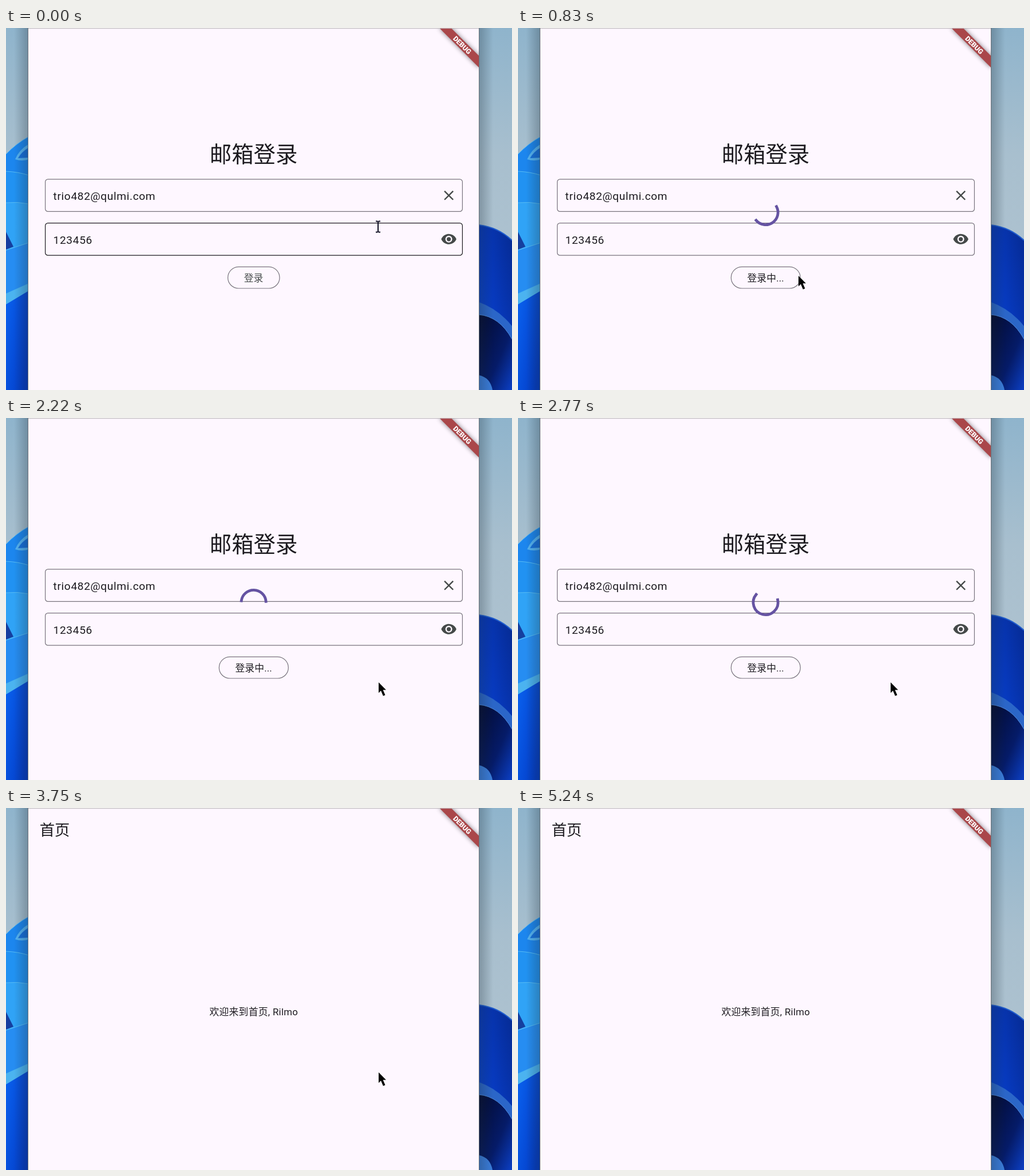
An HTML page that plays this animation: 884 by 634 pixels, repeating every 5.7 s.

```html
<!DOCTYPE html>
<html lang="zh">
<head>
<meta charset="utf-8">
<title>邮箱登录</title>
<style>
  html, body { margin: 0; width: 100%; height: 100%; overflow: hidden; background: #fef7ff; }
  svg { display: block; width: 100vw; height: 100vh; }
  text { font-family: Roboto, "Noto Sans CJK SC", "Noto Sans CJK", sans-serif; fill: #1d1b20; }
  .mid { text-anchor: middle; }
  .input { font-size: 19.2px; letter-spacing: .6px; }
  .label { font-size: 16.8px; letter-spacing: .12px; }
  .box { fill: none; stroke: #79747e; stroke-width: 1.2; }
  .icon { fill: #454949; }
  .cursor { fill: #000; stroke: #fff; stroke-width: .7; paint-order: stroke; }
</style>
</head>
<body>
<svg viewBox="0 0 884 634" preserveAspectRatio="none">
  <defs>
    <linearGradient id="sky" x2="0" y2="1">
      <stop offset="0" stop-color="#8fb4cc"/>
      <stop offset=".35" stop-color="#a8bfce"/>
      <stop offset="1" stop-color="#b4c5d1"/>
    </linearGradient>
    <linearGradient id="deepL" x1="0" x2="1" y2=".6">
      <stop offset="0" stop-color="#0a62f0"/>
      <stop offset="1" stop-color="#033cc6"/>
    </linearGradient>
    <linearGradient id="deepR" x1="1" y1="0" x2="0" y2="1">
      <stop offset="0" stop-color="#062a92"/>
      <stop offset=".5" stop-color="#0739bd"/>
      <stop offset="1" stop-color="#0a4de0"/>
    </linearGradient>
    <linearGradient id="night" x2="1" y2="1">
      <stop offset="0" stop-color="#03092f"/>
      <stop offset=".6" stop-color="#051b68"/>
      <stop offset="1" stop-color="#0c3fc4"/>
    </linearGradient>
    <linearGradient id="shade">
      <stop offset="0" stop-color="#1a2a36" stop-opacity="0"/>
      <stop offset="1" stop-color="#1a2a36" stop-opacity=".3"/>
    </linearGradient>
    <filter id="soft" x="-30%" y="-150%" width="160%" height="400%">
      <feGaussianBlur stdDeviation="4.5"/>
    </filter>
    <clipPath id="pane"><rect x="39" y="1" width="787" height="633"/></clipPath>
  </defs>

  <rect width="884" height="634" fill="url(#sky)"/>
  <g id="left">
    <path d="M0 221Q18 202 40 190V634H0Z" fill="#1c86ee"/>
    <path d="M40 203Q22 214 16 230Q28 234 40 230Z" fill="#55b4f3"/>
    <path d="M40 209Q27 217 21 228L40 227Z" fill="#1670dc"/>
    <path d="M0 251Q22 252 40 258V308Q20 304 0 306Z" fill="#2192f2"/>
    <path d="M0 306Q20 304 40 308V380L0 390Z" fill="#30a3f6"/>
    <path d="M0 390L40 376V450L0 466Z" fill="#268df2"/>
    <path d="M0 251Q22 252 40 258M0 306Q20 304 40 308M0 221Q18 202 40 190M0 389L40 376" fill="none" stroke="#58bdf5"/>
    <path d="M0 357L13 383L0 388Z" fill="#153f9f"/>
    <path d="M0 484L40 459V634H0Z" fill="url(#deepL)"/>
    <path d="M0 465L40 447V460L0 484Z" fill="#4bb3f0"/>
  </g>
  <g id="right">
    <path d="M826 345Q860 349 884 372V634H826Z" fill="url(#deepR)"/>
    <path d="M826 345Q860 349 884 372" fill="none" stroke="#1f5ccd" stroke-width="2"/>
    <path d="M826 480Q860 492 884 522V545Q860 505 826 502Z" fill="#2b66c8"/>
    <path d="M826 502Q862 505 884 545V634H826Z" fill="url(#night)"/>
    <path d="M826 502Q862 505 884 545" fill="none" stroke="#4f8bdc"/>
    <path d="M826 608Q846 612 850 634H826Z" fill="#3a7cda"/>
  </g>
  <rect x="14" width="25" height="634" fill="url(#shade)"/>
  <rect width="25" height="634" fill="url(#shade)" transform="translate(851) scale(-1 1)"/>

  <rect x="38.5" y="-2" width="788" height="640" fill="#fef7ff" stroke="#6b7379"/>
  <rect x="39" width="787" height="1.3" fill="#c5c1c6"/>

  <g id="login">
    <text class="mid" x="432.6" y="235.4" font-size="38.4">邮箱登录</text>
    <rect class="box" x="68.6" y="264.8" width="728.8" height="56.6" rx="4.8"/>
    <text class="input" x="82.6" y="301">trio482@qulmi.com</text>
    <path class="icon" transform="translate(759.2 278.8) scale(1.2)" d="M19 6.4L17.6 5 12 10.6 6.4 5 5 6.4 10.6 12 5 17.6 6.4 19 12 13.4 17.6 19 19 17.6 13.4 12z"/>
    <rect class="box" id="pass" x="68.6" y="341.6" width="728.8" height="56.6" rx="4.8"/>
    <text class="input" x="82.6" y="378">123456</text>
    <path class="icon" transform="translate(759.2 355.4) scale(1.2)" fill-rule="evenodd" d="M12 4.5C7 4.5 2.7 7.6 1 12c1.7 4.4 6 7.5 11 7.5s9.3-3.1 11-7.5c-1.7-4.4-6-7.5-11-7.5zM12 17a5 5 0 1 1 0-10 5 5 0 0 1 0 10zM12 9a3 3 0 1 0 0 6 3 3 0 0 0 0-6z"/>
    <rect class="box" id="button" y="418.4" height="37.6" rx="18.8"/>
    <text class="label mid" id="caption" x="432.6" y="443.8"></text>
    <path id="spinner" fill="none" stroke="#6553a2" stroke-width="4.8" stroke-linecap="square"/>
  </g>

  <g id="home">
    <text x="58.7" y="47.6" font-size="26.4">首页</text>
    <text class="mid" x="432.8" y="363.3" font-size="16.8" letter-spacing=".3">欢迎来到首页, Rilmo</text>
  </g>

  <g clip-path="url(#pane)">
    <g transform="translate(826 1) rotate(45)">
      <rect x="-48" y="33.6" width="96" height="14.4" opacity=".5" filter="url(#soft)"/>
      <rect x="-48" y="33.6" width="96" height="14.4" fill="#aa474a"/>
      <text class="mid" y="45.2" font-size="12.2" font-weight="900" style="fill:#fff">DEBUG</text>
    </g>
  </g>

  <circle id="click" cx="431" cy="423" r="15" fill="#f6f02c" opacity=".75"/>
  <g id="cursor">
    <path id="beam" d="M-4 -10.5H-1L0 -9.5L1 -10.5H4V-8.5H1V8.5H4V10.5H1L0 9.5L-1 10.5H-4V8.5H-1V-8.5H-4Z" fill="#0b0b20"/>
    <path id="hand" class="cursor" d="M-1.8 1Q0 -2 1.8 1V8L5 8.6 8.5 9.6 11.5 11Q13 12 12.4 15L10 20.5V25H-2.5V22L-8 16.5Q-10.5 13.5 -8 12.8L-4.8 14.5 -1.8 16Z"/>
    <path id="arrow" class="cursor" d="M0 0V18.4L4 14.6 7.9 23.8 11.5 22.2 7.6 13.2H13Z"/>
  </g>
</svg>
<script>
const LOOP = 5700, TICK = 69.4;
const PRESS = 480, RELEASE = 550, IDLE = 760, HOME = 3750;
const $ = id => document.getElementById(id);
const show = (id, on) => $(id).style.display = on ? '' : 'none';

// time, x, y, pointer
const moves = [
  [0, 650, 348, 'beam'], [70, 622, 356, 'beam'], [140, 540, 382, 'beam'],
  [210, 458, 409, 'arrow'], [280, 431, 423, 'hand'],
  [830, 490, 434, 'arrow'], [900, 568, 453, 'arrow'], [970, 632, 462, 'arrow'],
  [1040, 651, 463, 'arrow'], [4350, 648, 463, 'arrow'], [4420, 645, 463, 'arrow']
];
for (let i = 1; i < 8; i++) {
  const p = (i / 7) ** 1.5;
  moves.push([4680 + 70 * i, 645 + 225 * p, 463 + 148 * p, 'arrow']);
}
moves.push([5240, 0, 0, '']);

// cubic-bezier(.4, 0, .2, 1)
function ease(x) {
  if (x <= 0) return 0;
  if (x >= 1) return 1;
  let lo = 0, hi = 1;
  for (let i = 0; i < 24; i++) {
    const s = (lo + hi) / 2, r = 1 - s;
    if (1.2 * r * r * s + .6 * r * s * s + s ** 3 < x) lo = s; else hi = s;
  }
  return lo * lo * (3 - 2 * lo);
}

function arc(ms) {
  const cycle = ms / 1333 % 1;
  const head = 270 * ease(cycle * 2), tail = 270 * ease(cycle * 2 - 1);
  const start = -90 + tail + ms / 2222 * 360 + cycle * 90;
  const sweep = Math.max(head - tail, .5);
  const point = deg => {
    const a = deg * Math.PI / 180;
    return `${432.6 + 21.6 * Math.cos(a)} ${323 + 21.6 * Math.sin(a)}`;
  };
  return `M${point(start)}A21.6 21.6 0 ${sweep > 180 ? 1 : 0} 1 ${point(start + sweep)}`;
}

function draw(t) {
  const busy = t >= RELEASE;
  const tick = Math.floor((t + 6) / TICK) * TICK;
  show('login', t < HOME);
  show('home', t >= HOME);
  show('click', t >= PRESS && t < RELEASE);
  show('spinner', busy);
  if (busy && t < HOME) $('spinner').setAttribute('d', arc(Math.max(0, (tick - 552) * .96)));

  $('pass').style.stroke = t < 210 ? '#1d1b20' : '';
  const width = busy ? 121 : 90.4;
  $('button').setAttribute('x', 432.8 - width / 2);
  $('button').setAttribute('width', width);
  $('button').style.fill = t >= PRESS && t < IDLE ? '#efe8f6' : '';
  $('caption').textContent = busy ? '登录中...' : '登录';
  $('caption').style.fill = busy ? '' : '#474c4c';

  const [, x, y, kind] = moves.findLast(m => m[0] <= t);
  $('cursor').setAttribute('transform', `translate(${x} ${y})`);
  for (const id of ['beam', 'hand', 'arrow']) show(id, id === kind);
}

function frame() {
  draw(performance.now() % LOOP);
  requestAnimationFrame(frame);
}
frame();
</script>
</body>
</html>
```
